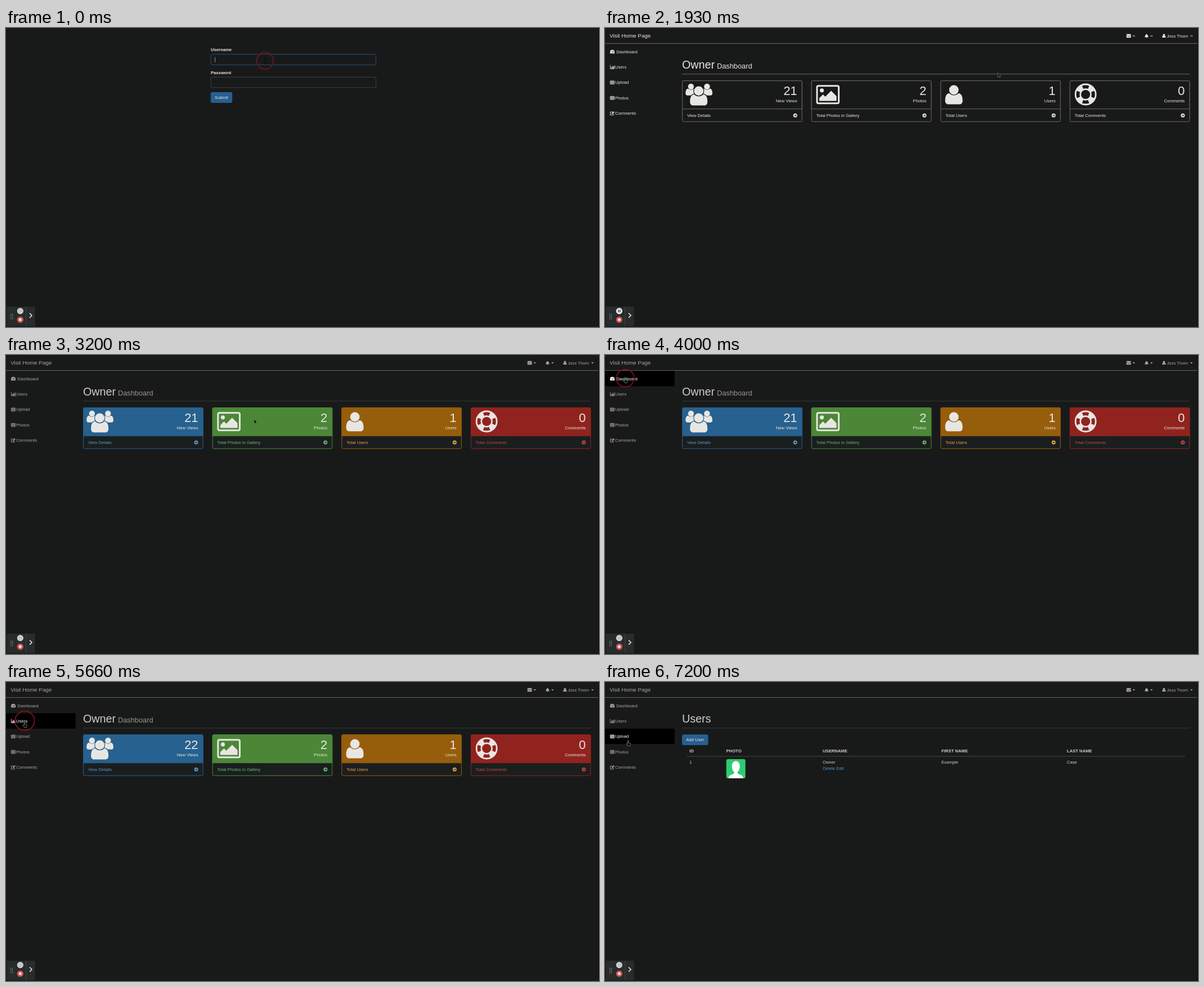
Write an HTML page that moves like this. It is 1054x531 px and loops after 8000 ms.

```html
<!DOCTYPE html>
<html lang="en">
<head>
<meta charset="utf-8">
<title>Dashboard walkthrough</title>
<style>
html, body { margin: 0; width: 100%; height: 100%; overflow: hidden; background: #181a1a; }
svg { display: block; width: 100%; height: 100%; --bg: #181a1a; --ink: #e8e6e3; --edge: #6f685d; }
text { font: 7.66px "Liberation Sans", Arial, Helvetica, sans-serif; fill: var(--ink); white-space: pre; }
.b { font-weight: bold; }
.end { text-anchor: end; }
.mid { text-anchor: middle; }
.brand { font-size: 9.85px; }
.h1 { font-size: 19.7px; fill: #d1cdc7; }
.small { font-size: 12.8px; fill: #9d9488; }
.num { font-size: 21.9px; }
.nav, .nav text { fill: #aaa49a; }
.nav .line { fill: none; stroke: #aaa49a; }
.on, .on text { fill: #fff; }
.on .line { stroke: #fff; }
.ink { fill: var(--ink); }
.outline { fill: none; stroke: var(--ink); }
.bar { stroke: #5f625b; }
.rule { stroke: #373a37; }
.cell { fill: #cfcbc4; }
.grid { stroke: #454848; }
.link { fill: #4a97d0; }
.btn { fill: #265f90; stroke: #2a6496; }
.head { fill: var(--c); stroke: var(--c); }
.foot { fill: #1b1e1f; stroke: var(--c); }
.gap { stroke: var(--c); }
.tint { fill: var(--t); }
.flat { display: none; }
.raw text, .raw .nav, .raw .tint { fill: var(--ink); }
.raw .nav .line { stroke: var(--ink); }
.raw .bar, .raw .rule, .raw .grid { stroke: var(--edge); }
.raw .btn, .raw .head, .raw .foot { fill: var(--bg); stroke: var(--edge); }
.raw .gap { stroke: var(--bg); }
.raw .flat { display: inline; }
.raw .tri { display: none; }
.field { fill: #181a1a; stroke: #3b4042; }
.field.focus { stroke: #1b5474; }
.field.filled { fill: #26323e; stroke: #344350; }
#send.focus { fill: #1d4a70; stroke: #c9dcec; stroke-width: 1.6; }
</style>
</head>
<body>
<svg id="stage" viewBox="0 0 1054 531" preserveAspectRatio="none"></svg>
<script>
const LOOP = 8000;
const ROW = 27.4;
const LOGIN_FILL = 530, SEND = 1130, DASH = 1660, RELOAD = 4200, USERS = 6130;
const RAW = [[DASH, 2530], [RELOAD, 5660], [USERS, 7130]];

const text = (x, y, s, cls = "") => `<text x="${x}" y="${y}" class="${cls}">${s}</text>`;
const box = (x, y, w, h, extra = "", r = 2) =>
  `<rect x="${x}" y="${y}" width="${w}" height="${h}" rx="${r}" ${extra}/>`;
const dot = (x, y, r, extra = "") => `<circle cx="${x}" cy="${y}" r="${r}" ${extra}/>`;
const path = (d, extra = "") => `<path d="${d}" ${extra}/>`;
const at = (x, y, body, extra = "") => `<g transform="translate(${x} ${y})" ${extra}>${body}</g>`;

// Small menu icons, drawn from their top left corner
const gauge = path("M0 7V4.4a4 4 0 0 1 8 0V7Z") +
  path("M4 5.6 5.4 2.2M1.4 4.6h.9M5.8 4.6h.9", 'stroke="#181a1a" stroke-width=".9"');
const chart = path("M.4 0V6.8H8.4", 'class="line" stroke-width=".8"') +
  path("M1.6 4h1.2v2H1.6ZM3.3 2h1.2v4H3.3ZM5 3h1.2v3H5ZM6.7 1h1.2v5H6.7Z");
const table = path("M.4.9H7.4V6.6H.4ZM.4 2.7H7.4M.4 4.6H7.4M2.7.9V6.6M5.1.9V6.6", 'class="line" stroke-width=".8"');
const edit = path("M5 1.2H.5V6.8H6.3V4.6", 'class="line" stroke-width=".9"') +
  path("M2.6 5.2 3 3.6 6.6 0 8 1.3 4.4 4.9Z");
const person = dot(3, 2, 1.9) + path("M0 6.7c-.3-3 1-3.4 1.6-3.4a2 2 0 0 0 2.8 0c.6 0 1.9.4 1.6 3.4Z");
const mail = box(0, 0, 8, 6.4, "", .7) + path("M0 1.6 4 4.4 8 1.6", 'fill="none" stroke="#181a1a" stroke-width=".7"');
const bell = path("M0 6C1.4 5 1.2 1 3.7.7 6.2 1 6 5 7.4 6ZM2.8 6.4h1.8a.9.9 0 0 1-1.8 0Z");
const caret = x => path(`M${x} 13h4.4l-2.2 2.4Z`, 'class="tri"') +
  `<g class="flat">${box(x, 13.2, 4.4, 1.9, 'fill="#8a8276"', 0)}</g>`;

// Large card icons, placed relative to the card corner
const bust = (x, y, s, extra = "") => at(x, y, dot(0, 0, 8.4) +
  path("M-15.5 19C-15.5 8-11 6-8 6a11 11 0 0 0 16 0c3 0 7.500 2 7.500 13 0 4-2 6.500-5.500 6.500h-20c-3.500 0-5.500-2.500-5.500-6.500Z"),
  `class="ink" ${extra}`).replace(")\"", `) scale(${s})"`);
const crowd = bust(15.500, 10.5, .62) + bust(44, 10.5, .62) +
  bust(29.3, 18.4, 1, 'stroke-width="2.400" style="paint-order:stroke" ').replace('class="ink"', 'class="ink gap"');
const picture = box(9.9, 9.2, 38.6, 31, 'class="outline" stroke-width="3"', 2.500) +
  dot(18.500, 17.300, 3.6, 'class="ink"') +
  path("M14 36V31l6.500-6.500 4 4L35 18l9.500 9.500V36Z", 'class="ink"');
const buoy = at(28, 24.5, dot(0, 0, 18, 'class="outline" stroke-width="2.800"') +
  dot(0, 0, 9.4, 'class="outline" stroke-width="2.600"') +
  dot(0, 0, 13.6, 'class="outline" stroke-width="8" pathLength="8" stroke-dasharray="1 1" stroke-dashoffset="-.5"'));

const cards = [
  ["21", "New Views", "View Details", "#26618f", "#559bd0", crowd],
  ["2", "Photos", "Total Photos in Gallery", "#4b8737", "#69bd62", picture],
  ["1", "Users", "Total Users", "#965d0b", "#eba643", bust(23.500, 16.500, 1)],
  ["0", "Comments", "Total Comments", "#91231e", "#c94a42", buoy],
];

function card([count, label, foot, color, tint, icon], i) {
  const arrow = dot(200.8, 61.8, 3.5, 'class="tint"') +
    path("M198.800 61.800h3.400M200.900 60.100l1.700 1.700-1.700 1.700", 'fill="none" stroke="#1b1e1f" stroke-width="1"');
  return at(137.3 + i * 229.65, 93.5,
    box(.2, .2, 212.6, 72.6, 'class="foot"') +
    path("M.2 50.200V2.200a2 2 0 0 1 2-2H210.800a2 2 0 0 1 2 2V50.200Z", 'class="head"') + icon +
    `<text x="204.200" y="25.700" class="num end" ${i ? "" : 'id="views"'}>${count}</text>` +
    text(204.2, 38.6, label, "end") + text(8.6, 64.6, foot, "tint") + arrow,
    `style="--c:${color};--t:${tint}"`);
}

const login = text(364, 41.2, "Username", "b") + box(364.2, 46.7, 293.3, 18.6, 'id="user" class="field"') +
  text(364, 81.7, "Password", "b") + box(364.2, 87.2, 293.3, 18.6, 'id="pass" class="field"') +
  box(364.3, 114.4, 37.4, 18, 'id="send" class="btn"') + text(383, 126.3, "Submit", "mid") +
  `<g id="typed">${text(371, 58.8, "Owner")}${[0, 1, 2, 3].map(i => dot(372.6 + i * 2.75, 96.7, 1.15, 'class="ink"')).join("")}</g>` +
  path("M371.500 52V60.500", 'id="caret" stroke="#bdbbb7" stroke-width=".8"');

const menu = [["Dashboard", gauge, 20.3], ["Users", chart, 18], ["Upload", table, 18], ["Photos", table, 18], ["Comments", edit, 18]];
const shell = path("M0 27.500H1053", 'class="bar"') +
  `<g class="nav">${text(8.2, 17, "Visit Home Page", "brand")}` +
  at(926.8, 10.8, mail) + caret(937.7) + at(958.900, 10.2, bell) + caret(969.2) +
  at(990.5, 10.4, person) + text(998.5, 16.6, "Joss Thorn") + caret(1040.2) + "</g>" +
  menu.map(([name, icon, x], i) => `<g class="nav item">` +
    box(0, 28 + i * ROW, 123.6, ROW, 'class="hover" style="fill:#000"', 0) +
    at(9, 38.3 + i * ROW, icon) + text(x, 44.5 + i * ROW, name) + "</g>").join("") +
  path("M137 81.800H1039", 'class="rule"');

const dash = text(137, 72.3, "Owner", "h1") + text(199, 72.3, "Dashboard", "small") + cards.map(card).join("");

const columns = [[150, "ID", "1"], [215.5, "PHOTO", ""], [387, "USERNAME", "Owner"],
  [598, "FIRST NAME", "Example"], [821, "LAST NAME", "Case"]];
const users = text(137, 72.3, "Users", "h1") + box(137.5, 93.8, 45.4, 17.8, 'class="btn"') +
  text(160.2, 105.3, "Add User", "mid") +
  columns.map(([x, name, value]) => text(x, 124.5, name, "b cell") + text(x, 145.4, value, "cell")).join("") +
  path("M145.500 132H1031", 'class="grid"') + text(387, 156.4, "Delete Edit", "link") +
  at(215.6, 137, box(0, 0, 34, 34, 'fill="#2ecc71"', 3) +
    path("M4 34c0-4.500 2.500-5.500 7-7 2.500-.9 3-2 3-4-2.500-2.500-4-6-4-10.500C10 7 12.500 3.500 17 3.500s7 3.500 7 9c0 4.500-1.500 8-4 10.500 0 2 .5 3.100 3 4 4.500 1.500 7 2.500 7 7Z", 'fill="#fff"'));

const grip = [0, 1, 2, 3].map(i => dot(8.7, 508.4 + i * 2.6, .7) + dot(11.6, 508.4 + i * 2.6, .7)).join("");
const recorder = box(1.5, 495, 50, 34.5, 'fill="#292c2d"', 1) + path("M35.500 495V529.500", 'stroke="#3b3f40"') +
  `<g fill="#a7aaa8">${grip}</g>` + dot(25.3, 502.6, 5.6, 'id="pause"') +
  path("M23.900 500.200V505M26.700 500.200V505", 'id="bars" stroke-width="1.300"') +
  dot(25.3, 518, 5.6, 'fill="#d9534f"') + box(23.1, 515.8, 4.4, 4.4, 'fill="#f4eeee"', .6) +
  path("M42 506.500 46 510.500 42 514.500", 'fill="none" stroke="#eee" stroke-width="1.500"');

const pointers = {
  beam: path("M-1.500-4.500H1.500M0-4.500V4.500M-1.500 4.500H1.500", 'fill="none" stroke="#050606"'),
  arrow: path("M0 0V8L1.900 6.300 3.200 9 4.400 8.400 3.200 5.800H5.500Z", 'fill="#0a0b0b" stroke="#8b8d8b" stroke-width=".6"'),
  hand: path("M-.8.6C-.8-.5.8-.5.8.6V4L3.600 4.600C4.600 5 4.400 6.200 3.500 9.500H-.6L-3 6C-3 5-1.700 5-.8 6Z", 'fill="#0a0b0b" stroke="#96999a" stroke-width=".7"'),
};

const stage = document.getElementById("stage");
const group = (id, body) => `<g id="${id}">${body}</g>`;
stage.innerHTML = box(0, 0, 1054, 531, 'fill="#181a1a"', 0) +
  group("login", login) + group("shell", shell) + group("dash", dash) + group("users", users) +
  path("M1053.500 0V531", 'stroke="#070808"') + recorder +
  group("pointer", Object.entries(pointers).map(([id, body]) => group(id, body)).join("")) +
  dot(0, 0, 0, 'id="ring" fill="none" stroke="#85131a" stroke-width="1.800"');

const el = {};
stage.querySelectorAll("[id]").forEach(n => el[n.id] = n);
const items = [...stage.querySelectorAll(".item")];
const show = (node, on) => node.style.display = on ? "" : "none";

const track = [[0, 461, 57], [600, 461, 57], [800, 460, 60], [1100, 393, 119], [1600, 396, 120],
  [1930, 698, 79], [2460, 706, 84], [2930, 706, 84], [3200, 441, 114], [3730, 60, 52],
  [4000, 36, 40], [4200, 36, 40], [4660, 32, 71], [5000, 33, 71], [5800, 33, 71], [6400, 41, 104]];
const clicks = [[-230, 460.5, 58.3], [SEND, 387, 122], [3800, 36, 41], [5660, 33.3, 69]];

function place(t) {
  const i = track.findIndex(k => k[0] > t);
  if (i < 0) return track[track.length - 1].slice(1);
  const [t0, x0, y0] = track[i - 1], [t1, x1, y1] = track[i];
  const u = (t - t0) / (t1 - t0), s = u * u * (3 - 2 * u);
  return [x0 + (x1 - x0) * s, y0 + (y1 - y0) * s];
}

function drawRing(t) {
  const click = clicks.find(([start]) => t >= start && t < start + 400);
  show(el.ring, click);
  if (!click) return;
  const u = Math.max(0, (t - click[0] - 140) / 260);
  el.ring.setAttribute("cx", click[1]);
  el.ring.setAttribute("cy", click[2]);
  el.ring.setAttribute("r", 17.3 - 7 * u);
  el.ring.setAttribute("opacity", 1 - u * u);
}

function draw(t) {
  const inside = t >= DASH, filled = t >= LOGIN_FILL;
  const raw = RAW.some(([a, b]) => t >= a && t < b);
  stage.classList.toggle("raw", raw);
  show(el.login, !inside);
  show(el.shell, inside);
  show(el.dash, inside && t < USERS);
  show(el.users, t >= USERS);

  show(el.typed, filled);
  show(el.caret, !filled);
  el.user.classList.toggle("focus", t < SEND);
  el.user.classList.toggle("filled", filled);
  el.pass.classList.toggle("filled", filled);
  el.send.classList.toggle("focus", t >= SEND);
  el.views.textContent = t < RELOAD ? "21" : "22";
  el.pause.setAttribute("fill", raw ? "#eceeec" : "#cdd0cb");
  el.bars.setAttribute("stroke", raw ? "#26292a" : "#b3b6b1");

  const [x, y] = place(t);
  const row = inside && x < 124 ? Math.floor((y - 28) / ROW) : -1;
  items.forEach((item, i) => {
    item.classList.toggle("on", i === row);
    show(item.firstElementChild, i === row);
  });
  const overSend = !inside && x < 402 && y > 112;
  const shape = row >= 0 || overSend ? "hand" : !inside && y < 108 ? "beam" : "arrow";
  for (const id in pointers) show(el[id], id === shape);
  el.pointer.setAttribute("transform", `translate(${x} ${y})`);
  drawRing(t);
}

const origin = performance.now();
function tick() {
  draw((performance.now() - origin) % LOOP);
  requestAnimationFrame(tick);
}
tick();
</script>
</body>
</html>
```
